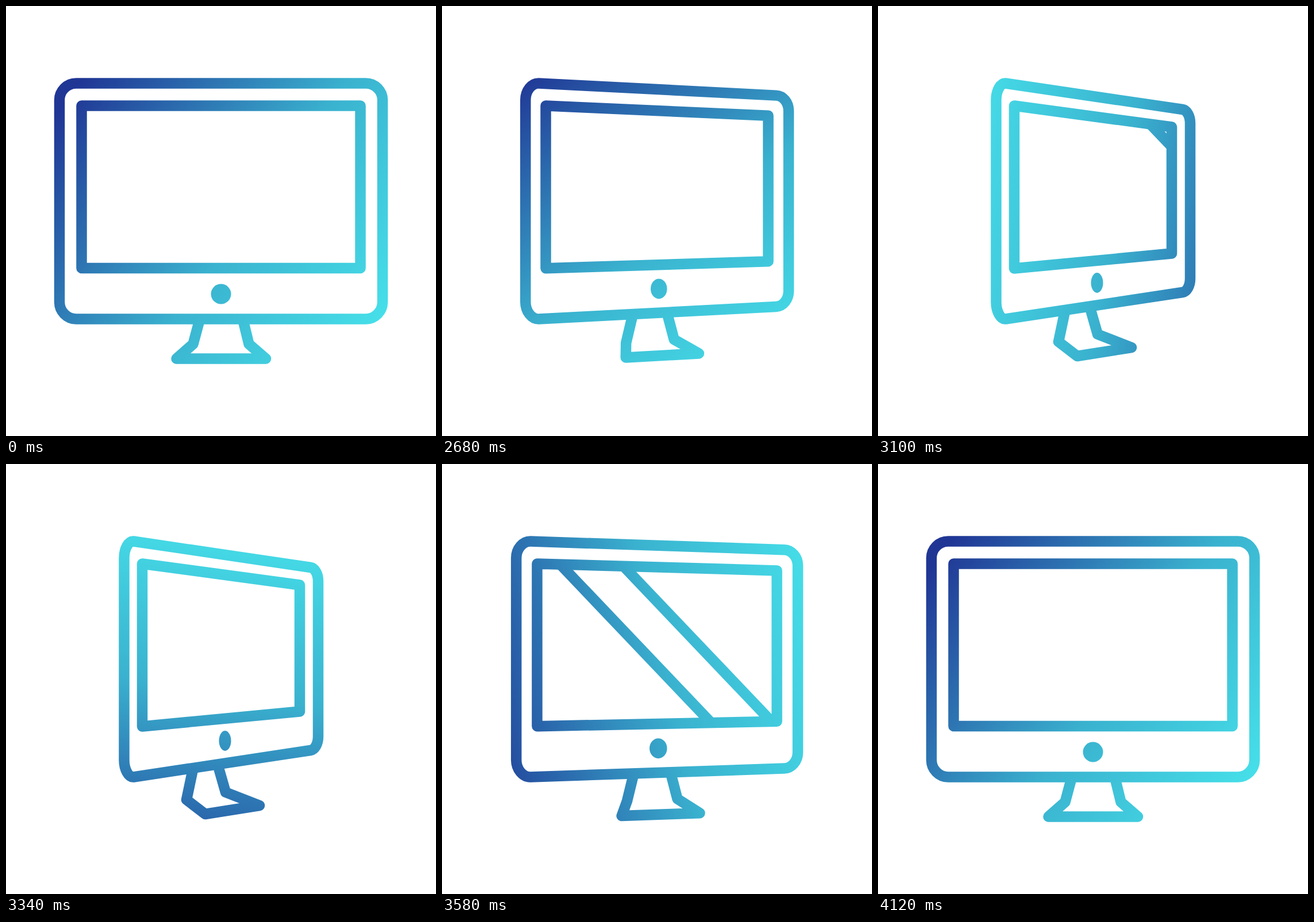
An HTML page without scripts for the animation above (4.15 s loop, 748 px wide and 748 px high).

```html
<!DOCTYPE html>
<html lang="en">
<head>
<meta charset="utf-8">
<title>Turning monitor</title>
<style>
html, body { margin: 0; height: 100%; overflow: hidden; background: #fff; }
svg { display: block; width: 100vw; height: 100vh; }

.line { fill: none; stroke: #fff; stroke-width: 18.5; stroke-linejoin: round; }
.dot { fill: #fff; }

/* Each part morphs between a front view and a turned view. */
.case {
  --front: path("M122 134.5 L626 134.5 C642 134.5 655 147.5 655 163.5 L655 515 C655 531 642 544.5 626 544.5 L122 544.5 C106 544.5 93 531 93 515 L93 163.5 C93 147.5 106 134.5 122 134.5 Z");
  --turned: path("M222 134.5 L530 180 C537 181 543 191 543 204 L543 474 C543 487 537 497 530 498 L222 544.5 C213 545.5 205.5 531 205.5 515 L205.5 163.5 C205.5 147.5 213 133.5 222 134.5 Z");
}
.screen {
  --front: path("M131.5 173.5 L616.5 173.5 L616.5 456 L131.5 456 Z");
  --turned: path("M237 173.5 L511 210.5 L511 430.5 L237 456.5 Z");
}
.stand {
  --front: path("M336.5 547 L325.5 588 L296.5 613.5 L452 613.5 L422.5 588 L412.5 547");
  --turned: path("M326 527 L314 584 L346.5 609 L441 594 L382 571 L368 522");
}
.dot {
  --front: path("M356.5 501 a17.5 17.5 0 0 1 35 0 a17.5 17.5 0 0 1 -35 0 Z");
  --turned: path("M370.5 481.5 a10.5 17.5 0 0 1 21 0 a10.5 17.5 0 0 1 -21 0 Z");
}
.part {
  d: var(--front);
  animation: turn 4.15s cubic-bezier(.33, 0, .33, 1) infinite;
}
@keyframes turn {
  0%, 60.24%, 92.77%, 100% { d: var(--front); }
  72.53%, 80.48% { d: var(--turned); }
}

.paint {
  transform-origin: 404px 397px;
  animation: spin 4.15s cubic-bezier(.3, 0, .53, 1) infinite;
}
@keyframes spin {
  0%, 60.24% { transform: rotate(0deg); }
  97.11%, 100% { transform: rotate(360deg); }
}

.glare { animation: sweep 4.15s linear infinite both; }
.second { animation-delay: .6s; }
@keyframes sweep {
  0%, 63.13% { transform: translateX(-460px); }
  68.92% { transform: translateX(-143px); }
  71.81% { transform: translateX(38px); }
  74.7% { transform: translateX(276px); }
  77.59%, 100% { transform: translateX(560px); }
}
</style>
</head>
<body>
<svg viewBox="0 0 748 748">
  <defs>
    <linearGradient id="blue" gradientUnits="userSpaceOnUse" x1="93" y1="134" x2="655" y2="544">
      <stop offset=".04" stop-color="#203695"/>
      <stop offset=".58" stop-color="#3ab2cf"/>
      <stop offset="1" stop-color="#46dfe9"/>
    </linearGradient>
    <clipPath id="inside"><path class="part screen"/></clipPath>
    <mask id="monitor" maskUnits="userSpaceOnUse" x="0" y="0" width="748" height="748">
      <path class="part line case"/>
      <path class="part line screen"/>
      <path class="part line stand"/>
      <path class="part dot"/>
      <g clip-path="url(#inside)">
        <path class="line glare" d="M95 100 L571 600 M220 100 L696 600"/>
        <path class="line glare second" d="M95 100 L571 600 M202 100 L678 600"/>
      </g>
    </mask>
  </defs>
  <g mask="url(#monitor)">
    <rect class="paint" x="-226" y="-261" width="1200" height="1200" fill="url(#blue)"/>
  </g>
</svg>
</body>
</html>
```
